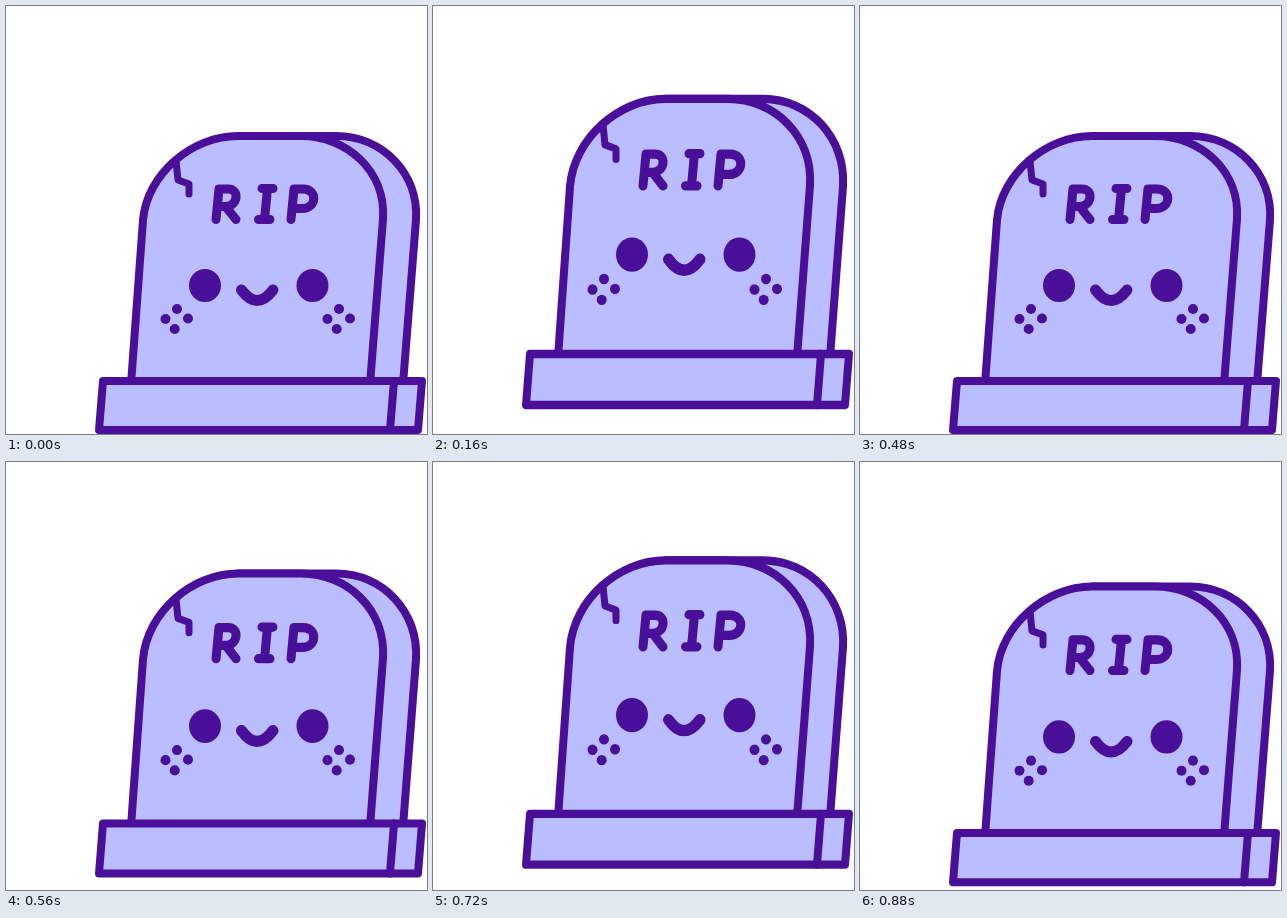
These frames come from a looping animation (421x428 px, 960 ms). An HTML page:

```html
<!DOCTYPE html>
<html lang="en">
<head>
<meta charset="utf-8">
<title>Happy tombstone</title>
<style>
  html, body { margin: 0; width: 100%; height: 100%; overflow: hidden; background: #fff; }
  svg { display: block; }
  .line { fill: #babdff; stroke: #4a0f98; stroke-width: 8; stroke-linejoin: round; stroke-linecap: round; }
  .open { fill: none; }
  .ink { fill: #4a0f98; }
</style>
</head>
<body>
<svg width="421" height="428" viewBox="0 0 421 428">
  <defs>
    <g id="cheek" class="ink">
      <circle cx="171" cy="303" r="5"/>
      <circle cx="159.5" cy="313" r="5"/>
      <circle cx="182" cy="312.5" r="5"/>
      <circle cx="168.7" cy="323" r="5"/>
    </g>
  </defs>
  <g id="stone">
    <g class="line">
      <path d="M232 130H330C377 130 413 168 410 214L397 378H125Z"/>
      <path d="M125 378L137 214C141 168 186 130 232 130H295C341 130 380 165 377 213L364 378Z"/>
      <path d="M97 375H416L412 424H93Z"/>
      <path class="open" d="M388 375L384 424"/>
      <path class="open" stroke-width="7" d="M170 155L172 174L183 178V188"/>
    </g>
    <g class="line open" style="stroke-width:9" role="img" aria-label="RIP">
      <path d="M210 213.5L213 183H222C234 183 232 200 220 200.500H212M220 201L230 213.500"/>
      <path d="M256 182.500H267M261.500 182.500L258.500 213.500M252.500 213.500H264"/>
      <path d="M285 213.500L288 183H297C312 183 311 202.500 296 202.500H287"/>
    </g>
    <path class="line open" style="stroke-width:11" d="M235.500 284Q251 305 267 284"/>
    <ellipse class="eye ink" cx="199" cy="279.500" rx="16" ry="16.500"/>
    <ellipse class="eye ink" cx="306.500" cy="279.500" rx="16" ry="16.500"/>
    <use href="#cheek"/>
    <use href="#cheek" x="162"/>
  </g>
</svg>
<script>
  const LOOP = 960, HOP = 480, RISE = 160, STEP = 80, GROUND = 424;
  const stone = document.getElementById('stone');
  const eyes = document.querySelectorAll('.eye');
  const ease = p => (1 - Math.cos(Math.PI * p)) / 2;

  function draw(now) {
    const t = Math.floor((now % LOOP) / STEP) * STEP;
    const hop = t % HOP;
    const lift = hop < RISE ? ease(hop / RISE) : ease((HOP - hop) / (HOP - RISE));
    const stretch = 1 + 0.041 * lift;
    stone.setAttribute('transform',
      `translate(0 ${GROUND - 25 * lift}) scale(1 ${stretch}) translate(0 ${-GROUND})`);

    // One blink, during the first fall only
    const blink = t > RISE && t < HOP ? ease((t - RISE) / 160) : 0;
    for (const eye of eyes) eye.setAttribute('ry', 16.5 - 7 * blink);

    requestAnimationFrame(draw);
  }
  draw(performance.now());
</script>
</body>
</html>
```
